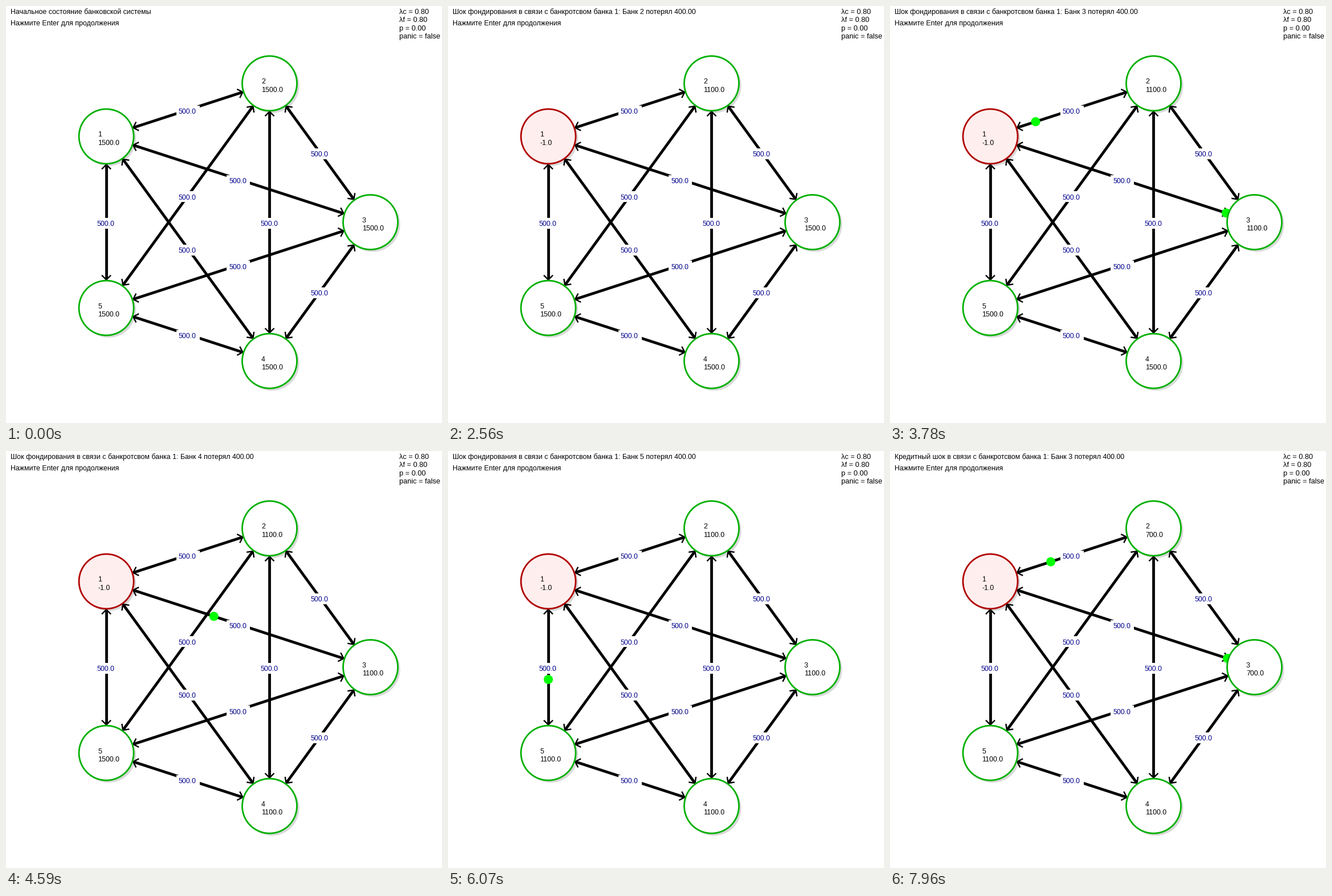
A matplotlib script for the animation above (7.99 s loop, 765x732 px).

```python
from itertools import combinations

import matplotlib.pyplot as plt
import numpy as np
from matplotlib.animation import FuncAnimation
from matplotlib.collections import LineCollection
from matplotlib.patches import Circle, Rectangle

W, H, DPI = 765, 732, 96
FRAMES, STEP = 235, 34
PT = 72 / DPI
RADIUS, TIP = 48, 49.5
TRAVEL = 1680

GREEN, RED, PINK = "#00b000", "#b00000", "#ffeeee"
SHADOW, NAVY, LIME = "#d9d9d9", "#00008b", "#00ff00"

plt.rcParams["font.family"] = "Liberation Sans"

fig = plt.figure(figsize=(W / DPI, H / DPI), dpi=DPI, facecolor="white")
ax = fig.add_axes([0, 0, 1, 1])
ax.set_xlim(0, W)
ax.set_ylim(H, 0)
ax.axis("off")

# Banks sit on a regular pentagon, numbered from the upper left.
ANGLES = np.radians([-144, -72, 0, 72, 144])
BANKS = {
    n: np.array([383.3 + 256.2 * np.cos(a), 379.5 + 256.2 * np.sin(a)])
    for n, a in enumerate(ANGLES, 1)
}

FUNDING = "Шок фондирования"
CREDIT = "Кредитный шок"
# (start of the transfer, kind of shock, bank that loses money)
SHOCKS = [
    (2570, FUNDING, 2),
    (3604, FUNDING, 3),
    (4459, FUNDING, 4),
    (5342, FUNDING, 5),
    (6908, CREDIT, 2),
    (7794, CREDIT, 3),
]
NOTICE_LEAD = 10
LOSS = 400
FAILURE = 1820
INTRO = [
    (0, "Начальное состояние банковской системы"),
    (990, "Начало симуляции: банк 1 потеряет весь капитал"),
    (1790, "Банк 1 обанкротился"),
]


def label(x, y, text, size=12.42, color="black", ha="left", z=8):
    return ax.text(x, y, text, fontsize=size * PT, color=color, ha=ha,
                   va="baseline", zorder=z)


def draw_edges():
    shafts, heads = [], []
    for a, b in combinations(BANKS, 2):
        p, q = BANKS[a], BANKS[b]
        u = (q - p) / np.hypot(*(q - p))
        n = np.array([-u[1], u[0]])
        shafts.append([p + u * (TIP + 1.5), q - u * (TIP + 1.5)])
        for tip, d in ((p + u * TIP, u), (q - u * TIP, -u)):
            heads.append([tip + 8 * (d + n), tip, tip + 8 * (d - n)])
        mx, my = (p + q) / 2
        ax.add_patch(Rectangle((mx - 20.5, my - 7.5), 41, 19, fc="white",
                               ec="none", zorder=3))
        label(mx - 0.8, my + 6.8, "500.0", color=NAVY, ha="center", z=4)
    ax.add_collection(LineCollection(shafts, colors="black", linewidths=4.8 * PT,
                                     capstyle="butt", zorder=2))
    ax.add_collection(LineCollection(heads, colors="black", linewidths=2.4 * PT,
                                     zorder=2))


def draw_banks():
    discs, values = {}, {}
    for n, (x, y) in BANKS.items():
        ax.add_patch(Circle((x + 4, y + 4), RADIUS, fc=SHADOW, ec="none", zorder=1))
        discs[n] = ax.add_patch(Circle((x, y), RADIUS, fc="white", ec=GREEN,
                                       lw=2.8 * PT, zorder=6))
        label(x - 14.5, y + 0.5, str(n))
        values[n] = label(x - 14.5, y + 15, "")
    return discs, values


draw_edges()
discs, values = draw_banks()
balls = [ax.add_patch(Circle(BANKS[bank], 8, fc=LIME, ec="none", zorder=5))
         for _, _, bank in SHOCKS]

headline = label(8, 14, "")
label(8, 33.7, "Нажмите Enter для продолжения")
for i, line in enumerate(["λc = 0.80", "λf = 0.80", "p = 0.00", "panic = false"]):
    label(690.5, 14 + 14.4 * i, line, size=12.7)


def draw(frame):
    t = frame * STEP + 10
    failed = t >= FAILURE
    discs[1].set_facecolor(PINK if failed else "white")
    discs[1].set_edgecolor(RED if failed else GREEN)

    capital = dict.fromkeys(BANKS, 1500.0)
    if failed:
        capital[1] = -1.0
    message = [text for start, text in INTRO if t >= start][-1]

    for ball, (start, kind, bank) in zip(balls, SHOCKS):
        if t >= start - NOTICE_LEAD:
            capital[bank] -= LOSS
            message = (f"{kind} в связи с банкротсвом банка 1: "
                       f"Банк {bank} потерял {LOSS:.2f}")
        part = (t - start) / TRAVEL
        ball.set_visible(0 <= part < 1)
        ball.center = tuple(BANKS[bank] + (BANKS[1] - BANKS[bank]) * part)

    headline.set_text(message)
    for n, value in values.items():
        value.set_text(f"{capital[n]:.1f}")
    return [headline, *balls, *discs.values(), *values.values()]


anim = FuncAnimation(fig, draw, frames=FRAMES, interval=STEP, repeat=True,
                     repeat_delay=0, blit=False)
plt.show()
```
